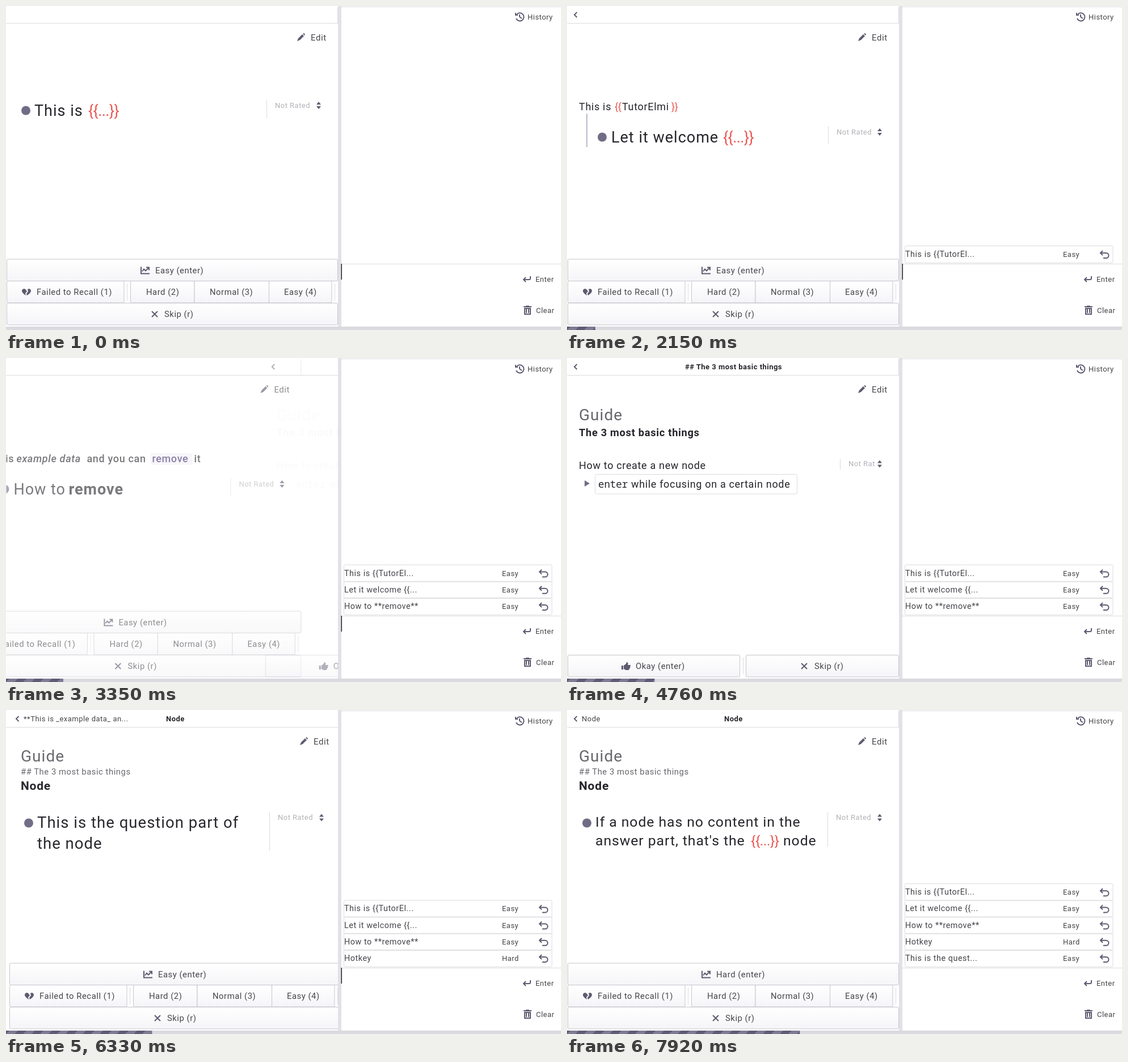
An HTML page for the animation above (8 s loop, 978 by 572 pixels).

```html
<!DOCTYPE html>
<html lang="en">
<head>
<meta charset="utf-8">
<title>Review cards</title>
<style>
  html, body { margin: 0; width: 100%; height: 100%; overflow: hidden; background: #fff; }
  svg { display: block; }
  text { font-family: Roboto, sans-serif; letter-spacing: .037em; fill: #25252b; white-space: pre; }
  .bold { font-weight: 600; }
  .medium { font-weight: 500; }
  .italic { font-weight: 500; font-style: italic; }
  .grey { fill: #66666c; }
  .ui { fill: #45454b; }
  .pale { fill: #b2b2b7; }
  .link { font-weight: 500; fill: #43306e; }
  .blank { fill: #ea5a55; letter-spacing: -.02em; }
  .mono { font-family: "Noto Sans Mono", monospace; letter-spacing: 0; }
  .box { fill: none; stroke: #dcdce0; }
  .button { fill: url(#shade); stroke: #c6c6cd; }
  .line { fill: none; stroke: #dcdce0; }
  .guide { fill: none; stroke: #bcb9cb; stroke-width: 2; }
  .solid { fill: #716c86; }
  .icon { fill: #5e5a70; }
  .stroke { fill: none; stroke: #5e5a70; stroke-width: 2; }
</style>
</head>
<body>
<svg id="stage" width="978" height="572" viewBox="0 0 978 572"></svg>
<script>
const LOOP = 8000, PAGE = 585, SPRING = 0.018, BLINK = 485;
const APP = 'TutorElmi';

const text = (x, y, str, size = 18, cls = '') =>
  `<text x="${x}" y="${y}" font-size="${size}" class="${cls}">${str}</text>`;
const rect = (x, y, right, bottom, cls, r = 2) =>
  `<rect x="${x}" y="${y}" width="${right - x}" height="${bottom - y}" rx="${r}" class="${cls}"/>`;
const path = (d, cls) => `<path d="${d}" class="${cls}"/>`;
const at = (x, y, inner) => `<g transform="translate(${x} ${y})">${inner}</g>`;
const bullet = (x, y) => `<circle cx="${x}" cy="${y}" r="8" class="solid"/>`;
const thread = (top, bottom) => path(`M35 ${top}V${bottom}`, 'guide');
const blank = (x, y, size) => text(x, y, '{{...}}', size, 'blank');

const icons = {
  chart: path('M-7-6V6H8M-5 2L-2-2L1 1L6-4M2-5H7V0', 'stroke'),
  heart: path('M-1-4C-3-7-8-6-8-2C-8 1-3 5-1 6L-2 2L1-1ZM2-5C5-7 8-5 8-2C8 1 4 4 1 6L0 3L3-1Z', 'icon'),
  cross: path('M-5-5L5 5M5-5L-5 5', 'stroke'),
  thumb: path('M-8-1H-5V6H-8ZM-4-1L0-4L1-7C4-7 4-4 3-2H7C9-2 8 0 7 1C8 2 7 4 6 4C6 6 5 7 3 7H0L-4 5Z', 'icon'),
  pencil: path('M-7 7L-5 2L2-5L5-2L-2 5ZM3-6L5-7L7-5L6-3Z', 'icon'),
  carets: path('M-4-1L0-6L4-1ZM-4 2H4L0 7Z', 'icon'),
  clock: path('M-5-4A7 7 0 1 1-6 3M-7-7V-3H-3M0-4V0L4 3', 'stroke'),
  enter: path('M6-5V-1Q6 1 4 1H-5M-2-3L-6 1L-2 5', 'stroke'),
  trash: path('M-7-6H7M-3-7H3M-5-3V7H5V-3ZM-2-2V5M2-2V5', 'stroke'),
  undo: path('M-6-3H3A4 4 0 0 1 3 6H-2M-3-7L-7-3L-3 1', 'stroke')
};
const icon = (x, y, name) => at(x, y, icons[name]);

const button = (x, y, right, iconX, iconName, labelX, label) =>
  rect(x, y, right, y + 38.5, 'button') +
  (iconName ? icon(iconX, y + 19.5, iconName) : '') +
  text(labelX, y + 24.5, label, 14.8, 'ui');

const rateButtons = best =>
  button(1.5, 447, 584.5, 245, 'chart', 263, `${best} (enter)`) +
  button(1.5, 485.5, 208, 36, 'heart', 54, 'Failed to Recall (1)') +
  button(219.5, 485.5, 332, 0, '', 247, 'Hard (2)') +
  button(332, 485.5, 463.5, 0, '', 359, 'Normal (3)') +
  button(463.5, 485.5, 574, 0, '', 490, 'Easy (4)') +
  button(1.5, 524.5, 584.5, 262, 'cross', 279, 'Skip (r)') +
  path('M213.5 490V520M579.5 490V520', 'line');

const okayButtons =
  button(1.5, 524.5, 304.5, 104, 'thumb', 121, 'Okay (enter)') +
  button(315.5, 524.5, 584.5, 418, 'cross', 436, 'Skip (r)') +
  path('M310.5 529V558', 'line');

const rating = (x, y, top, bottom, label = 'Not Rated') =>
  path(`M${x}.5 ${top}V${bottom}`, 'line') +
  text(x + 15, y + 4.5, label, 13, 'pale') + icon(551, y, 'carets');

const header = (previous, current, x) =>
  path('M17.5 11L13 15.5L17.5 20', 'stroke') +
  text(26, 20, previous, 13, 'ui') + text(x, 20, current, 13, 'bold');

const exampleLine = (y, size, xs) =>
  rect(xs[3] - 3, y - size * .9, xs[4] - 3, y + size * .25, 'chip') +
  ['This is', 'example data', 'and you can', 'remove', 'it'].map((word, i) =>
    text(xs[i], y, word, size, ['medium', 'italic', 'medium', 'link', 'medium'][i])).join('');

const nodeTitle = text(21, 90.5, 'Guide', 28, 'grey') +
  text(21, 114, '## The 3 most basic things', 14.8, 'grey') + text(21, 141, 'Node', 21, 'bold');

const pages = [
  { head: '', buttons: rateButtons('Easy'),
    body: bullet(35, 184.5) + text(50, 194, 'This is', 27) + blank(145, 194, 27) + rating(459, 175, 166, 198) },
  { head: header('', '', 0), buttons: rateButtons('Easy'),
    body: text(21, 184, 'This is') + text(84, 184, '{{', 18, 'blank') + text(97, 184, APP) +
      text(184, 184, '}}', 18, 'blank') + thread(190, 249) + bullet(62, 231.5) +
      text(78, 240.5, 'Let it welcome', 27) + blank(275, 240.5, 27) + rating(460, 222, 212, 244) },
  { head: header('', '', 0), buttons: rateButtons('Easy'),
    body: exampleLine(184, 18, [21, 83, 207, 322, 396]) + thread(190, 249) + bullet(62, 231.5) +
      text(78, 240.5, 'How to', 27) + text(175, 240.5, 'remove', 27, 'bold') + rating(460, 222, 212, 244) },
  { head: header('', '## The 3 most basic things', 208), buttons: okayButtons,
    body: text(21, 110, 'Guide', 28, 'grey') + text(21, 137.5, 'The 3 most basic things', 18.3, 'bold') +
      text(21, 195.5, 'How to create a new node') + rating(481, 186.5, 178, 197, 'Not Rat') +
      path('M31 216L40 221.5L31 227Z', 'solid') + rect(49.5, 205.5, 405.5, 240, 'box', 3) +
      text(55, 229, 'enter', 17.4, 'mono') + text(113, 229, 'while focusing on a certain node') },
  { head: header('## The 3 most basic things', '**This is _example data_ an...', 208), buttons: rateButtons('Hard'),
    body: exampleLine(136, 22, [21, 95, 242, 378, 464]) + text(21, 194, 'How to') +
      text(86, 194, 'remove', 18, 'bold') + thread(200, 259) + bullet(62, 241.5) +
      text(78, 250.5, 'Hotkey', 27) + rating(460, 231.5, 222, 254) },
  { head: header('**This is _example data_ an...', 'Node', 277), buttons: rateButtons('Easy'),
    body: nodeTitle + bullet(35, 199.5) + text(50, 207.5, 'This is the question part of', 27.5) +
      text(50, 244.5, 'the node', 27.5) + rating(459, 189.5, 180, 249) },
  { head: header('Node', 'Node', 277), buttons: rateButtons('Hard'),
    body: nodeTitle + bullet(35, 199.5) + text(50, 206, 'If a node has no content in the', 24.8) +
      text(50, 239, "answer part, that's the", 24.8) + blank(324, 239, 24.8) +
      text(381, 239, 'node', 24.8) + rating(459, 189.5, 180, 241) }
];

// Moments at which the next card is called for
const presses = [1040, 2230, 3302, 4770, 5952, 7150];
const history = [
  [0, `This is {{${APP.slice(0, 7)}...`, 'Easy'], [1, 'Let it welcome {{...', 'Easy'],
  [2, 'How to **remove**', 'Easy'], [4, 'Hotkey', 'Hard'], [5, 'This is the quest...', 'Easy']
].map(([press, label, grade]) => ({ time: presses[press], label, grade }));
const meterSteps = [[1532, 1], [2754, 2], [3700, 3], [4770, 5], [6350, 6], [7250, 8]];
const blinkStarts = [-335, ...presses.filter((_, i) => i !== 3)];

const stage = document.getElementById('stage');
stage.innerHTML = `
  <defs>
    <linearGradient id="shade" x2="0" y2="1"><stop stop-color="#fff"/><stop offset="1" stop-color="#f5f5f8"/></linearGradient>
    <pattern id="stripes" width="30" height="6" y="566" patternUnits="userSpaceOnUse">
      <path d="M0 0H30V6H0Z" fill="#5f5b76"/><path d="M6 0H21L15 6H0Z" fill="#7f7b92"/>
    </pattern>
    <clipPath id="left"><path d="M0.5 0H585V566H0.5Z"/></clipPath>
  </defs>
  <style>.chip { fill: #f3f1f8; }</style>
  <g clip-path="url(#left)">${path('M0 30.5H585', 'line')}
    ${pages.map(p => `<g class="page">${path('M584.5 2V30', 'line')}${p.head}${p.buttons}
      <g class="body">${icon(520, 55, 'pencil')}${text(537, 60.5, 'Edit', 15, 'ui')}${p.body}</g></g>`).join('')}
  </g>
  <rect x="585" width="6" height="566" fill="#e1e1e8"/>
  ${path('M590 1.5H978M590 455.5H978', 'line')}
  ${icon(905, 19, 'clock')}${text(919, 23.5, 'History', 13, 'ui')}
  ${icon(918, 482, 'enter')}${text(933, 487, 'Enter', 13, 'ui')}
  ${icon(919, 537, 'trash')}${text(934, 541.5, 'Clear', 13, 'ui')}
  ${history.map(h => `<g class="row">${rect(595.5, 423.5, 962, 453.5, 'box')}
    ${text(596, 443, h.label, 14.4, 'ui')}${text(874, 443, h.grade, 13, 'ui')}${icon(947, 439, 'undo')}</g>`).join('')}
  <rect id="cursor" x="590.5" y="455" width="1.5" height="28" fill="#25252b"/>
  <rect y="566" width="978" height="6" fill="#dadadf"/>
  <rect id="meter" y="566" height="6" fill="url(#stripes)"/>`;

const pageNodes = [...stage.querySelectorAll('.page')];
const bodyNodes = [...stage.querySelectorAll('.body')];
const rowNodes = [...stage.querySelectorAll('.row')];
const cursor = document.getElementById('cursor'), meter = document.getElementById('meter');

function place(node, x, opacity) {
  node.setAttribute('transform', `translate(${x} 0)`);
  node.setAttribute('opacity', opacity);
}

function drawPages(t) {
  const current = presses.filter(p => p <= t).length;
  const u = current ? (t - presses[current - 1]) * SPRING : 99;
  const rest = (1 + u) * Math.exp(-u);
  pageNodes.forEach((node, i) => {
    const entering = i === current, leaving = i === current - 1 && rest > 0.002;
    node.style.display = entering || leaving ? '' : 'none';
    if (entering) place(node, PAGE * rest, Math.sqrt(1 - rest));
    if (leaving) place(node, -PAGE / 2 * (1 - rest), rest * rest);
    bodyNodes[i].setAttribute('opacity', entering ? (1 - rest) ** 2 : 1);
  });
}

function drawHistory(t) {
  const count = history.filter(h => h.time <= t).length;
  rowNodes.forEach((node, i) => {
    node.style.display = i < count ? '' : 'none';
    place(node, 0, 1);
    node.setAttribute('transform', `translate(0 ${-29.2 * (count - 1 - i)})`);
  });
}

function drawMeter(t) {
  let done = 0;
  for (const [start, target] of meterSteps) {
    const k = Math.min(1, Math.max(0, (t - start) / 820));
    done += (target - done) * (1 - (1 - k) ** 2.5);
  }
  meter.setAttribute('width', done * 978 / 19);
}

function drawCursor(t) {
  const start = blinkStarts.filter(b => b <= t).pop();
  cursor.style.display = Math.floor((t - start) / BLINK) % 2 ? 'none' : '';
}

const begin = performance.now();
function tick() {
  const t = (performance.now() - begin) % LOOP;
  drawPages(t);
  drawHistory(t);
  drawMeter(t);
  drawCursor(t);
  requestAnimationFrame(tick);
}
tick();
</script>
</body>
</html>
```
